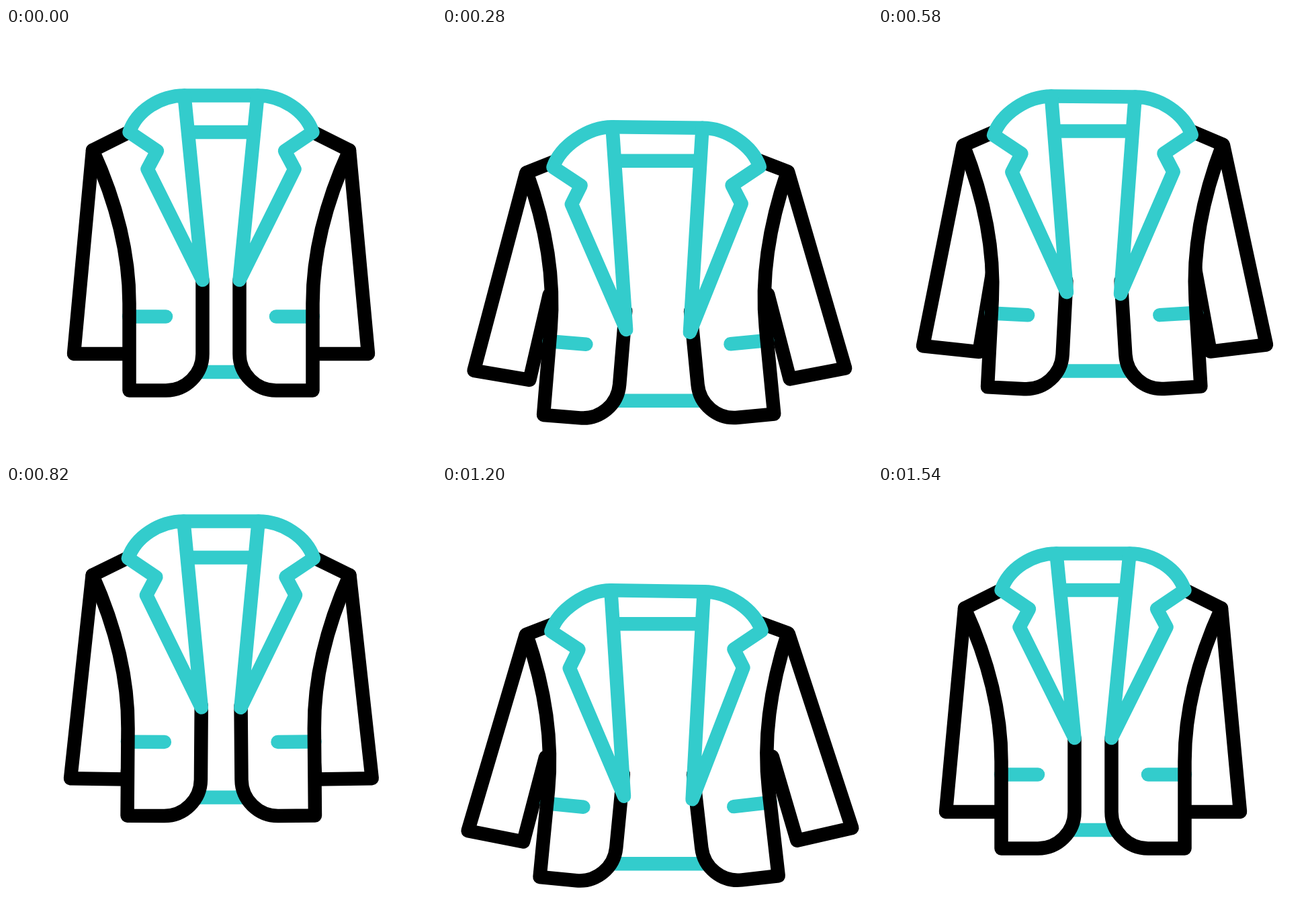
An HTML page with a canvas that plays this animation: 640x640 px, repeating every 2.4 s.

```html
<!DOCTYPE html>
<html lang="en">
<head>
<meta charset="utf-8">
<title>Blazer</title>
<style>
  html, body { margin: 0; height: 100%; overflow: hidden; background: #fff; }
  canvas { display: block; width: 100vw; height: 100vh; }
</style>
</head>
<body>
<canvas id="stage" width="640" height="640"></canvas>
<script>
const ctx = document.getElementById('stage').getContext('2d');
const LOOP = 2400, TEAL = '#33cccc', BLACK = '#000';

// Poses: time in ms, height offset, how far the jacket is open
const KEYS = [
  [0, 0, 0],
  [400, 54.4, 1],
  [760, -56.3, 0],
  [1133, 54.4, 1],
  [1533, 0, 0],
  [LOOP, 0, 0]
];

const SLEEVE = new Path2D('M129 182L101 485H185L193 355');
const SLEEVE_FILL = new Path2D('M129 182L101 485H185L193 355Z');
const PANEL = new Path2D(
  'M292.5 375V485A54.5 54.5 0 0 1 238 539.5H183.5V410C183.5 330 160 250 129 182L183 155');
const POCKET = new Path2D('M183 429.5H238');

// Lapel corners: top, tip, notch, lower notch, bottom
const LAPEL = [[265.5, 100.5], [183.5, 155], [225, 183], [210.5, 210], [292.5, 375]];
const LEFT = {
  sleeve: 12.1, panel: 6,
  shift: [[-15.3, 5], [-23, 12], [-23.3, 11], [-22.5, 12], [-23.3, 39.5]]
};
const RIGHT = {
  sleeve: 13.9, panel: 7,
  shift: [[-16.5, 7], [-20.7, 11], [-21, 10.5], [-20.5, 11], [-27.2, 44.5]]
};

function poseAt(time) {
  const next = Math.max(1, KEYS.findIndex(key => key[0] > time));
  const [t0, y0, open0] = KEYS[next - 1], [t1, y1, open1] = KEYS[next];
  const x = (time - t0) / (t1 - t0), ease = x * x * (3 - 2 * x);
  return [y0 + (y1 - y0) * ease, open0 + (open1 - open0) * ease];
}

function paint(path, stroke, fill) {
  if (fill) {
    ctx.fillStyle = '#fff';
    ctx.fill(fill);
  }
  ctx.strokeStyle = stroke;
  ctx.stroke(path);
}

function line(x1, y1, x2, y2) {
  const path = new Path2D();
  path.moveTo(x1, y1);
  path.lineTo(x2, y2);
  paint(path, TEAL);
}

function rotated(degrees, x, y, draw) {
  ctx.save();
  ctx.translate(x, y);
  ctx.rotate(degrees * Math.PI / 180);
  ctx.translate(-x, -y);
  draw();
  ctx.restore();
}

function mirrored(draw) {
  ctx.save();
  ctx.transform(-1, 0, 0, 1, 640, 0);
  draw();
  ctx.restore();
}

function drawBody(side, open) {
  rotated(side.sleeve * open, 182, 155, () => paint(SLEEVE, BLACK, SLEEVE_FILL));
  rotated(side.panel * open, 245, 143, () => {
    ctx.fillStyle = '#fff';
    ctx.fill(PANEL);
    paint(POCKET, TEAL);
    paint(PANEL, BLACK);
  });
}

const lapelPoints = (side, open) =>
  LAPEL.map(([x, y], i) => [x + side.shift[i][0] * open, y + side.shift[i][1] * open]);

function drawLapel([top, tip, ...rest]) {
  const path = new Path2D();
  path.moveTo(...top);
  path.bezierCurveTo(top[0] - 36, top[1], tip[0] + 11, tip[1] - 32, ...tip);
  rest.forEach(point => path.lineTo(...point));
  path.closePath();
  paint(path, TEAL, path);
}

function draw(time) {
  const [y, open] = poseAt(time);
  const left = lapelPoints(LEFT, open), right = lapelPoints(RIGHT, open);
  ctx.setTransform(1, 0, 0, 1, 0, 0);
  ctx.fillStyle = '#fff';
  ctx.fillRect(0, 0, 640, 640);
  ctx.lineWidth = 20.5;
  ctx.lineCap = ctx.lineJoin = 'round';
  ctx.translate(0, y);

  line(250, 512, 390, 512);
  line(268 - 12 * open, 155, 372 + 12 * open, 155);
  drawBody(LEFT, open);
  mirrored(() => drawBody(RIGHT, open));
  line(...left[0], 640 - right[0][0], right[0][1]);
  drawLapel(left);
  mirrored(() => drawLapel(right));
}

function tick() {
  draw(performance.now() % LOOP);
  requestAnimationFrame(tick);
}
tick();
</script>
</body>
</html>
```
